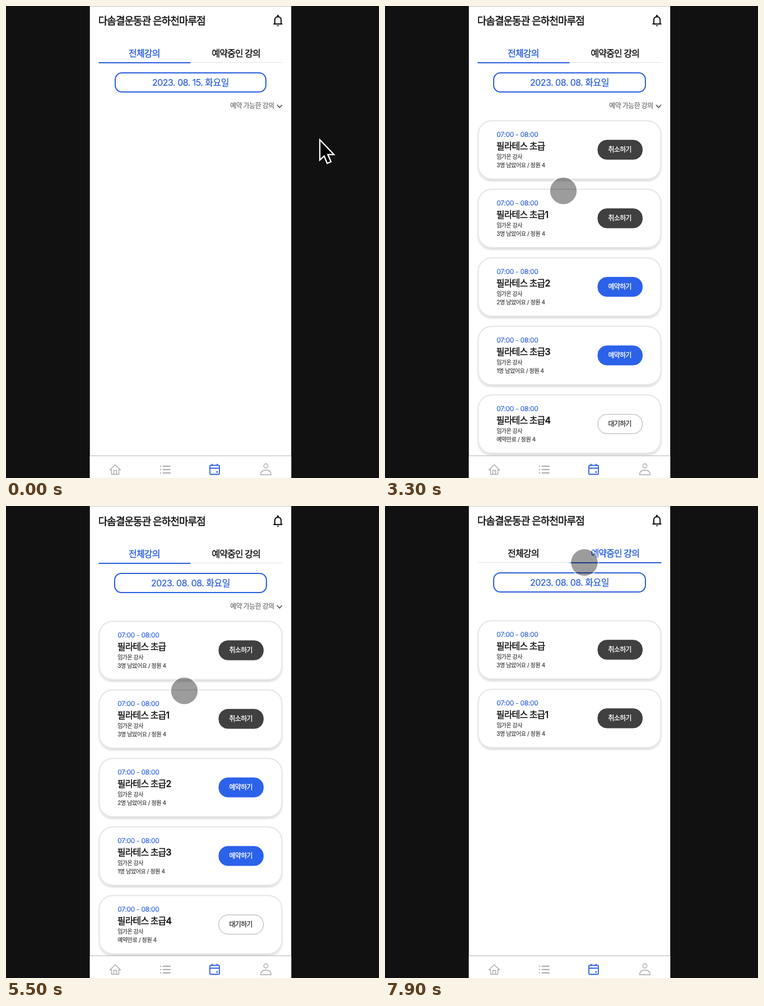
An HTML page that plays this animation: 666 px wide and 840 px high, repeating every 8000 ms.

```html
<!DOCTYPE html>
<html lang="ko">
<head>
<meta charset="utf-8">
<title>강의 예약</title>
<style>
html, body { margin: 0; width: 100%; height: 100%; overflow: hidden; background: #111; }
svg { display: block; width: 666px; height: 840px; }
text { font-family: Inter, "Noto Sans CJK KR", "Noto Sans CJK", "Noto Sans KR", sans-serif; }
</style>
</head>
<body>
<svg id="stage" viewBox="0 0 666 840" xmlns="http://www.w3.org/2000/svg"></svg>
<script>
const LOOP = 8000, STEP = 100;
const OPEN = 2000, CHOOSE = 3300, SWITCH = 7100;
const BLUE = '#2b5fe0', INK = '#111';
const stage = document.getElementById('stage');

// Text placed by its vertical centre; a hairline stroke thickens the weight
function label(x, cy, size, str, o = {}) {
  const { fill = INK, bold = false, mid = false, track = -0.053, id = '' } = o;
  return `<text ${id && `id="${id}"`} x="${x}" y="${cy + size * 0.37}" font-size="${size}"
    font-weight="${bold ? 500 : 400}" fill="${fill}" stroke="${fill}"
    stroke-width="${size * (bold ? 0.026 : 0.014)}" text-anchor="${mid ? 'middle' : 'start'}"
    letter-spacing="${size * track}">${str}</text>`;
}

function box(x, y, w, h, r, attrs) {
  return `<rect x="${x}" y="${y}" width="${w}" height="${h}" rx="${r}" ${attrs}/>`;
}

const CANCEL = { text: '취소하기', fill: '#404040', edge: '#404040', ink: '#fff' };
const BOOK = { text: '예약하기', fill: '#2c62ea', edge: '#2c62ea', ink: '#fff' };
const WAIT = { text: '대기하기', fill: '#fff', edge: '#aaa', ink: '#333' };

function card(i) {
  const seats = Math.min(3, 4 - i);
  const button = i < 2 ? CANCEL : seats ? BOOK : WAIT;
  const status = seats ? `${seats}명 남았어요` : '예약만료';
  return `<g class="card" transform="translate(0 ${i * 122})">
    ${box(166.5, 204.3, 326, 103.7, 24, 'fill="#fff" stroke="#e5e5e5" stroke-width="2" filter="url(#shade)"')}
    ${label(199.3, 229, 12, '07:00 - 08:00', { fill: BLUE, track: -0.026 })}
    ${label(198.8, 249, 16, '필라테스 초급' + (i || ''), { bold: true })}
    ${label(199.2, 268.5, 10, '임가온 강사', { fill: '#333' })}
    ${label(199.2, 283.5, 10, status + ' / 정원 4', { fill: '#333', track: -0.038 })}
    ${box(380, 238.7, 79.5, 34.3, 16, `fill="${button.fill}" stroke="${button.edge}"`)}
    ${label(419.2, 256, 12, button.text, { fill: button.ink, bold: true, mid: true })}
  </g>`;
}

function repeat(n, make) { return Array.from({ length: n }, (_, i) => make(i)).join(''); }

function dateText(day) {
  const name = '일월화수목금토'[new Date(2023, 7, day).getDay()];
  return `2023. 08. ${String(day).padStart(2, '0')}. ${name}요일`;
}

function dateLabel(cy, day, o) {
  return label(329.5, cy, 16, dateText(day), { mid: true, track: -0.033, fill: BLUE, ...o });
}

const BELL = `<g fill="none" stroke="#111" stroke-width="2" stroke-linejoin="round">
  <path d="M477.5 32H493.5M480 31.5V24.5a5.6 5.6 0 0 1 11.2 0V31.5"/>
  <path d="M485.5 19V17" stroke-width="3" stroke-linecap="round"/>
  <path d="M483.5 34.2h4a2 1.8 0 0 1 -4 0z" fill="#111" stroke="none"/></g>`;

const NAV = `<rect x="149.5" y="800" width="360" height="40" fill="#fff"/>
  <path d="M149.5 800.5H509.5" stroke="#b4b4b4"/>
  <g fill="none" stroke="#aaa" stroke-width="1.4" stroke-linejoin="round" stroke-linecap="round">
    <path d="M185.5 825.5L195 816.5L204.5 825.5H201.5V833.5H188.5V825.5ZM192.5 833V826.5H197.5V833"/>
    ${repeat(3, i => `<path d="M280.5 ${819 + 6 * i}h12.5M275.8 ${819 + 6 * i}h.5" stroke-width="1.9"/>`)}
    <circle cx="464" cy="818.5" r="3.7"/>
    <path d="M454.5 834.3C454.5 828.5 458 826 464 826S473.500 828.5 473.5 834.3Z"/>
  </g>
  <g fill="none" stroke="${BLUE}" stroke-width="1.8" stroke-linejoin="round">
    <rect x="364" y="817.5" width="17" height="16" rx="1.5"/>
    <path d="M364 822.5H381M368 818V814.8M377 818V814.8"/>
    <rect x="375.5" y="828" width="2.6" height="2.6" fill="${BLUE}" stroke="none"/>
  </g>`;

stage.innerHTML = `
  <defs>
    <filter id="shade" x="-5%" y="-10%" width="110%" height="125%">
      <feDropShadow dx="0" dy="3" stdDeviation="1.8" flood-color="#000" flood-opacity=".13"/>
    </filter>
    <clipPath id="screen"><rect x="149.5" width="360" height="840"/></clipPath>
  </defs>
  <rect width="666" height="840" fill="#111"/>
  <g clip-path="url(#screen)">
    <rect x="149.5" width="360" height="840" fill="#fff"/>
    <g id="page">
      ${label(164.7, 26.5, 18, '다솜결운동관 은하천마루점', { bold: true })}
      ${BELL}
      ${label(246.8, 84, 16, '전체강의', { id: 'tabAll', bold: true, mid: true })}
      ${label(410.8, 84, 16, '예약중인 강의', { id: 'tabMine', bold: true, mid: true })}
      <path d="M165.5 100.5H493.5" stroke="#e2e2e2"/>
      <rect id="underline" y="100" width="164" height="2" fill="${BLUE}"/>
      <rect id="dateBox" y="119" height="34" rx="12" fill="#fff" stroke="${BLUE}" stroke-width="2"/>
      ${dateLabel(136, 15, { id: 'date' })}
      <g id="filter">
        ${label(400.3, 177.5, 12, '예약 가능한 강의', { fill: '#666' })}
        <path d="M484 176L488.5 180.7L493 176" fill="none" stroke="#555" stroke-width="1.7"/>
      </g>
      ${repeat(5, card)}
      <g id="list">
        ${box(195, 119, 269, 314, 12, `fill="#fff" stroke="${BLUE}" stroke-width="2"`)}
        ${dateLabel(136, 15)}
        ${repeat(7, i => dateLabel(174 + i * 39, 4 + i, { fill: '#333' }))}
      </g>
    </g>
    ${NAV}
    <path d="M149.5 .5H509.5" stroke="#c4c4c4"/>
  </g>
  <path id="arrow" d="M1.3 2V38.2L9 31L14.5 44L21.3 41.2L15.6 28.3H26.5Z"
    fill="#000" stroke="#fff" stroke-width="2.3"/>
  <g id="touch">
    <circle r="25" fill="none" stroke="#fff" stroke-opacity=".5" stroke-width="2.5"/>
    <circle r="23.5" fill="#000" fill-opacity=".39" stroke="#000" stroke-opacity=".1"/>
  </g>`;

const el = {};
stage.querySelectorAll('[id]').forEach(n => { el[n.id] = n; });
const cards = stage.querySelectorAll('.card');

const HOME = { x: 559, y: 236 };
const GLIDES = [
  { from: 900, to: 1500, x: 397, y: 166.5 },
  { from: 1500, to: 1800, x: 391, y: 158 },
  { from: 1950, to: 3100, x: 318.5, y: 329 },
  { from: 5800, to: 6580, x: 409, y: 114 },
  { from: 6600, to: 6900, x: 408, y: 104 },
  { from: 7300, to: 7900, x: 356, y: 100.5 }
];

function progress(t, from, to) { return Math.min(1, Math.max(0, (t - from) / (to - from))); }
function easeOut(p) { return 1 - (1 - p) ** 3; }

function pointer(t) {
  return GLIDES.reduce((at, g) => {
    const p = easeOut(progress(t, g.from, g.to));
    return { x: at.x + (g.x - at.x) * p, y: at.y + (g.y - at.y) * p };
  }, HOME);
}

// A drag up and back, resting one pixel low until the next move ends
function scroll(t) {
  const drag = Math.sin(Math.PI * progress(t, 4500, 5500)) ** 2;
  return progress(t, 5300, 5500) - progress(t, 6200, 6500) - 23.5 * drag;
}

function show(node, on) { node.setAttribute('visibility', on ? 'visible' : 'hidden'); }
function move(node, x, y) { node.setAttribute('transform', `translate(${x} ${y})`); }
function paint(node, color) {
  node.setAttribute('fill', color);
  node.setAttribute('stroke', color);
}

function draw(t) {
  const chosen = t >= CHOOSE, mine = t >= SWITCH;
  const { x, y } = pointer(t);
  const outside = x > 509;

  move(el.page, 0, scroll(t));
  paint(el.tabAll, mine ? INK : BLUE);
  paint(el.tabMine, mine ? BLUE : INK);
  el.underline.setAttribute('x', mine ? 329.5 : 165.5);
  el.date.textContent = dateText(chosen ? 8 : 15);
  el.dateBox.setAttribute('x', chosen ? 194 : 195);
  el.dateBox.setAttribute('width', chosen ? 271 : 269);
  show(el.filter, !mine);
  show(el.list, t >= OPEN && !chosen);
  cards.forEach((c, i) => show(c, chosen && (!mine || i < 2)));

  show(el.arrow, outside);
  show(el.touch, !outside);
  move(outside ? el.arrow : el.touch, x, y);
}

const start = performance.now();
function tick() {
  const t = (performance.now() - start) % LOOP;
  draw(Math.floor(t / STEP) * STEP);
  requestAnimationFrame(tick);
}
draw(0);
requestAnimationFrame(tick);
</script>
</body>
</html>
```
